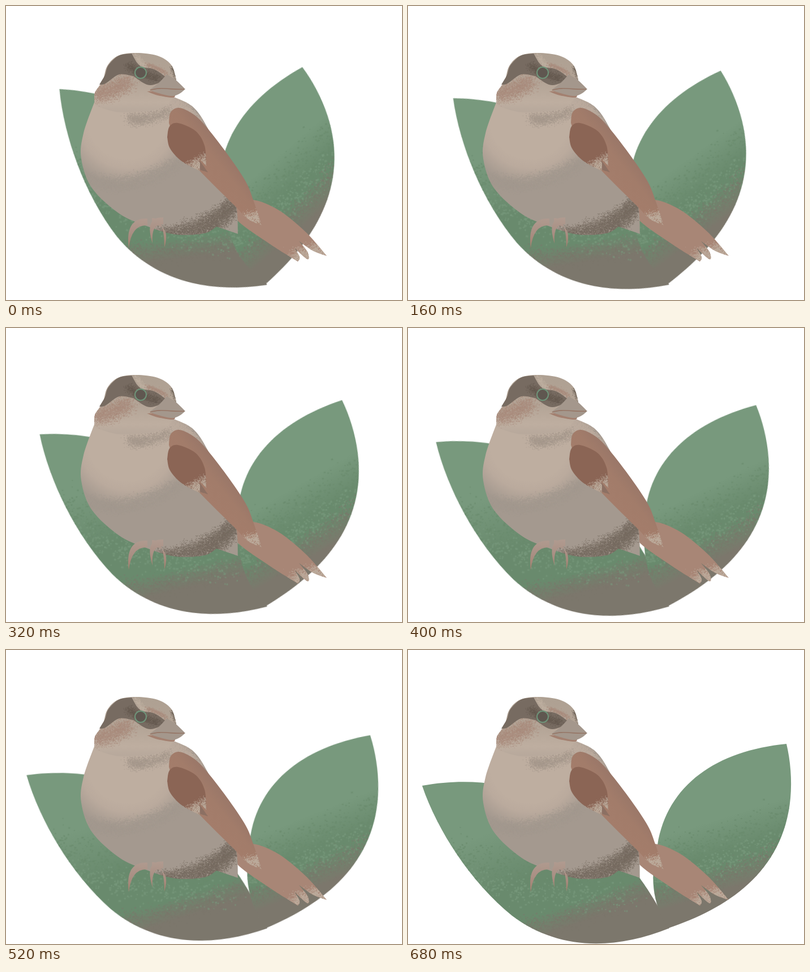
Recreate the animation shown at these times as an HTML page with a canvas. Size 700 by 520 pixels, loop 1920 ms.

```html
<!DOCTYPE html>
<html lang="en">
<head>
<meta charset="utf-8">
<title>Bird and leaves</title>
<style>
html, body { margin: 0; height: 100%; overflow: hidden; background: #fff }
canvas { display: block }
</style>
</head>
<body>
<canvas id="stage" width="700" height="520"></canvas>
<script>
const W = 700, H = 520, LOOP = 1920, STEP = 40, STEPS = 17;
const PIVOT = [456, 489];
const stage = document.getElementById('stage').getContext('2d');

let seed = 7;
const rnd = () => (seed = (seed * 16807) % 2147483647) / 2147483647;
const bell = () => (rnd() + rnd() + rnd() - 1.5) / 1.5;

function sheet(draw) {
  const c = document.createElement('canvas');
  // Extra room keeps the rotated leaves from being cropped.
  c.width = W + 40;
  c.height = H + 40;
  draw(c.getContext('2d'));
  return c;
}

function gradient(g, line, ...stops) {
  const f = line.length == 4 ? g.createLinearGradient(...line) : g.createRadialGradient(...line);
  stops.forEach(([at, color]) => f.addColorStop(at, color));
  return f;
}

// Closed shape of smooth runs through key points, with a corner after each run.
function outline(...runs) {
  const path = new Path2D();
  let last = runs.at(-1).at(-1);
  path.moveTo(...last);
  for (const run of runs) {
    const pts = [last, ...run];
    for (let i = 0; i < run.length; i++) {
      const b = pts[i], c = pts[i + 1], a = pts[i - 1] || b, d = pts[i + 2] || c;
      path.bezierCurveTo(b[0] + (c[0] - a[0]) / 6, b[1] + (c[1] - a[1]) / 6,
        c[0] - (d[0] - b[0]) / 6, c[1] - (d[1] - b[1]) / 6, ...c);
    }
    last = run.at(-1);
  }
  return path;
}

// Scatters grain around a quadratic curve.
function spray(g, color, [x0, y0, cx, cy, x1, y1], spread, size = 1.2, density = 1.2) {
  const count = (Math.hypot(x1 - x0, y1 - y0) + spread) * spread * density;
  g.fillStyle = color;
  for (let i = 0; i < count; i++) {
    const t = rnd(), u = 1 - t, s = size * (0.6 + rnd() * 0.7);
    g.fillRect(u * u * x0 + 2 * u * t * cx + t * t * x1 + bell() * spread,
      u * u * y0 + 2 * u * t * cy + t * t * y1 + bell() * spread, s * (0.8 + rnd() * 0.6), s);
  }
}

function part(g, path, fill, ...grain) {
  g.save();
  g.fillStyle = fill;
  g.fill(path);
  g.clip(path);
  g.globalAlpha = 0.6;
  grain.forEach(a => spray(g, ...a));
  g.restore();
}

const LIGHT = '#78997d', DARK = '#698a6d', EARTH = '#7c776c';
const TAN = '#beaea0', GREY = '#a4998f', SHADE = '#776b61', RUST = '#a27c6a', PALE = '#c0b1a2';
const CHEEK = '#ab8d7e', BEAK = '#a4978c';

const leaf = (d, axis, stops, edge, rim) => sheet(g => part(g, new Path2D(d),
  gradient(g, axis, ...stops.map((at, i) => [at, [LIGHT, DARK, DARK, EARTH][i]])),
  [DARK, edge, 50, 2.4, 0.03],
  [LIGHT, edge.map((v, i) => v + i % 2 * 35), 40, 2.8, 0.03],
  [EARTH, rim, 28, 1.6, 0.15]));

const leftLeaf = leaf(
  'M25 240C52 320 112 412 184 470C262 529 360 533 462 492C385 330 235 202 25 240Z',
  [70, 188, 210, 564], [.38, .62, .8, .89],
  [30, 335, 150, 410, 400, 400], [200, 490, 310, 480, 450, 405]);

const rightLeaf = leaf(
  'M669 166C546 178 458 238 441 345C428 400 430 445 460 492C562 458 664 394 676 262C679 230 676 195 669 166Z',
  [60, 190, 180, 570], [.63, .78, .83, .94],
  [430, 365, 550, 350, 680, 295], [430, 433, 560, 413, 680, 340]);

const bird = sheet(g => {
  // Tail
  part(g, outline([[437, 343], [482, 361], [530, 400], [567, 442]], [[543, 433], [518, 416]],
    [[533, 435], [533, 448], [510, 428]], [[519, 444], [516, 452]], [[465, 420], [408, 378], [408, 352]]),
    '#a88676', [PALE, [508, 448, 535, 437, 565, 432], 24]);

  // Body
  part(g, outline([[137, 225], [133, 270], [152, 322], [200, 367], [248, 389], [300, 404], [350, 402], [372, 390]],
    [[410, 403]], [[406, 350], [380, 270], [356, 215], [330, 178], [292, 159]], [[200, 140]], [[157, 168]]),
    gradient(g, [215, 200, 70, 215, 200, 118], [0, TAN], [.35, '#baaa9d'], [1, GREY]),
    [GREY, [130, 305, 215, 335, 305, 275], 22],
    [TAN, [300, 170, 325, 185, 345, 210], 16],
    ['#a5988c', [218, 198, 240, 207, 290, 184], 17],
    [SHADE, [265, 404, 335, 402, 400, 350], 22],
    [SHADE, [330, 408, 375, 395, 405, 345], 24]);

  // Head
  part(g, outline([[157, 154], [171, 132], [179, 106], [198, 88], [230, 83], [268, 88], [292, 104], [301, 130]],
    [[294, 162], [280, 178], [258, 185]], [[200, 188], [157, 176]]),
    gradient(g, [0, 85, 0, 185], [0, '#aea092'], [.5, '#b3a496'], [.85, TAN], [1, '#b8a99c']),
    [CHEEK, [150, 156, 185, 154, 217, 132], 25],
    [CHEEK, [246, 104, 265, 106, 284, 120], 7],
    [PALE, [228, 86, 236, 96, 246, 108], 8],
    [SHADE, [293, 108, 299, 117, 302, 130], 7]);
  part(g, outline([[175, 122], [181, 105], [199, 88], [222, 84]], [[237, 106], [262, 112], [283, 126]],
    [[268, 137], [249, 139], [225, 124]], [[200, 121], [176, 137], [165, 139]]),
    SHADE, ['#665a51', [215, 104, 235, 120, 270, 128], 12]);

  // Beak and eye
  part(g, outline([[272, 151], [299, 157]], [[295, 162], [268, 158], [249, 151]]), '#a38070');
  part(g, outline([[270, 136], [284, 121]], [[299, 130], [317, 147]], [[305, 156], [290, 159], [262, 152]], [[254, 148]]), BEAK);
  g.strokeStyle = '#967666';
  g.lineWidth = 1.6;
  g.stroke(new Path2D('M255 149C273 142 295 149 315 147'));
  g.beginPath();
  g.arc(238, 118, 10, 0, 7);
  g.fillStyle = '#5f5750';
  g.fill();
  g.strokeStyle = '#6f957a';
  g.lineWidth = 2;
  g.stroke();

  // Wing
  part(g, outline([[291, 188], [306, 180], [332, 192], [356, 216], [395, 267], [424, 311], [437, 343], [452, 388]],
    [[428, 377], [404, 353], [340, 289], [303, 245], [288, 207]]),
    gradient(g, [335, 285, 385, 245], [0, '#a47d6b'], [.55, RUST], [1, '#987668']),
    [PALE, [416, 382, 435, 376, 456, 370], 20]);
  part(g, outline([[357, 294]], [[343, 290]], [[340, 270]]), '#8c7063');
  part(g, outline([[289, 213], [304, 207], [335, 221], [351, 247], [354, 283]], [[342, 270]], [[343, 292]],
    [[310, 274], [290, 252], [285, 232]]),
    '#8b6555', [PALE, [322, 288, 340, 286, 360, 268], 20]);

  // Feet
  const skin = gradient(g, [0, 374, 0, 428], [0, '#b09b90'], [.5, '#a98f83'], [1, '#a47f6e']);
  const toe = (x, y, cx, cy, tip, w = 6) => part(g,
    new Path2D(`M${x} ${y - w}Q${cx - w} ${cy - w} ${tip}Q${cx + w} ${cy + w} ${x} ${y + w}Z`), skin);
  toe(250, 382, 216, 380, '217 428');
  toe(278, 380, 250, 378, '259 420');
  toe(258, 381, 286, 380, '280 427');
});

function drawLeaf(image, degrees) {
  stage.save();
  stage.translate(...PIVOT);
  stage.rotate(degrees * Math.PI / 180);
  stage.drawImage(image, -PIVOT[0], -PIVOT[1]);
  stage.restore();
}

function frame(now) {
  const x = Math.min(Math.floor(now % LOOP / STEP) / STEPS, 1);
  const rest = 1 - (x + x * x * (3 - 2 * x)) / 2;
  stage.clearRect(0, 0, W, H);
  drawLeaf(leftLeaf, 13.4 * rest);
  drawLeaf(rightLeaf, -23.3 * rest);
  stage.drawImage(bird, 0, 0);
  requestAnimationFrame(frame);
}
requestAnimationFrame(frame);
</script>
</body>
</html>
```
